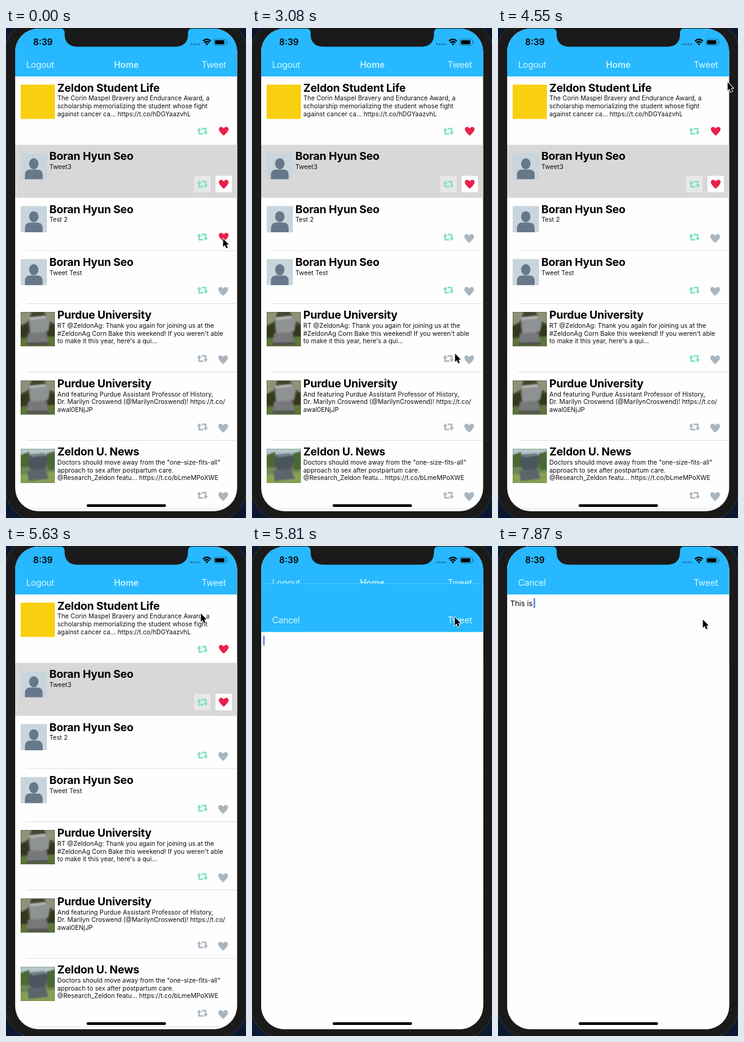
Animation, 393 px wide and 799 px high, one loop 8 s. Source, as an HTML page:

```html
<!DOCTYPE html>
<html lang="en">
<head>
<meta charset="utf-8">
<title>Timeline</title>
<style>
  html, body { margin: 0; width: 100%; height: 100%; overflow: hidden; background: #0a1830; }
  svg { display: block; width: 393px; height: 799px; font-family: Inter, "Liberation Sans", sans-serif; }
  text { white-space: pre; }
  .name { font-size: 18px; font-weight: 700; letter-spacing: -.22px; }
  .body { font-size: 10.35px; fill: #111; }
  .nav { font-size: 14.4px; letter-spacing: -.32px; fill: #d2f8ff; }
  .nav.bold { font-weight: 600; letter-spacing: -.1px; fill: #c6f5ff; }
  .clock { font-size: 14.2px; font-weight: 600; }
  .draft { font-size: 12px; }
</style>
</head>
<body>
<svg id="stage" viewBox="0 0 393 799">
  <defs>
    <clipPath id="screen"><rect x="15" y="1" width="363.5" height="787" rx="38"/></clipPath>
    <clipPath id="face"><rect width="43" height="43"/></clipPath>
    <clipPath id="square"><rect width="56" height="56"/></clipPath>
    <filter id="soft"><feGaussianBlur stdDeviation=".9"/></filter>
    <path id="heart" d="M0 7.2C-3 5.2-8-.2-8-3.2C-8-7.8-2.2-8.6 0-4.4C2.2-8.6 8-7.8 8-3.2C8-.2 3 5.2 0 7.2Z"/>
    <g id="share">
      <path d="M-5.3-1.4V4.2H1.4M-1.4-4.2H5.3V1.4" fill="none" stroke="currentColor" stroke-width="2.6"/>
      <path d="M-9-.9L-5.3-6L-1.6-.9ZM9 .9L5.3 6L1.6 .9Z" fill="currentColor"/>
    </g>
    <g id="person" clip-path="url(#face)">
      <rect width="43" height="43" fill="#c9d5dc"/>
      <path d="M7 43V36Q7 27 16 27H27Q36 27 36 36V43Z" fill="#66788a"/>
      <ellipse cx="21.5" cy="17.5" rx="7.7" ry="9" fill="#66788a"/>
    </g>
    <g id="badge"><rect width="56" height="56" fill="#f9d00f"/></g>
    <g id="stone" clip-path="url(#square)">
      <rect width="56" height="56" fill="#45452f"/>
      <g filter="url(#soft)">
        <path d="M0 0H18L12 16L0 22ZM38 0H56V20L46 14Z" fill="#8f9279"/>
        <path d="M0 24L12 20L14 40H0ZM46 22H56V42H44Z" fill="#34391f"/>
        <path d="M0 43L56 40V56H0Z" fill="#5d7637"/>
        <path d="M13 9L40 6L48 15L45 31L32 36H16Z" fill="#8e9293"/>
        <path d="M13 9L40 6L43 10L17 13Z" fill="#b2b5b3"/>
        <path d="M12 35L42 33L46 52H10Z" fill="#77787a"/>
        <path d="M10 50L46 49V54H9Z" fill="#515150"/>
      </g>
    </g>
    <g id="garden" clip-path="url(#square)">
      <rect width="56" height="56" fill="#6f8758"/>
      <g filter="url(#soft)">
        <path d="M0 0H56V12L40 17L0 11Z" fill="#b6c8cc"/>
        <path d="M0 10L14 5L18 30H0ZM42 8L56 4V34H44Z" fill="#4c6836"/>
        <path d="M0 42L56 38V56H0Z" fill="#87a052"/>
        <path d="M16 9L39 7L45 16L41 32L18 36L12 25Z" fill="#4b555d"/>
        <path d="M16 9L39 7L41 11L19 14Z" fill="#77838c"/>
        <path d="M11 36L40 32L46 49L13 53Z" fill="#5d656a"/>
      </g>
    </g>
  </defs>

  <rect x="-1.5" y="-15" width="396.5" height="819" rx="54" fill="#1a1a1a" stroke="#38393c"/>
  <g clip-path="url(#screen)">
    <rect width="393" height="799" fill="#fefefe"/>
    <g id="list"></g>
    <rect width="393" height="79" fill="#27b8ff"/>
    <text class="nav" x="33" y="64.7">Logout</text>
    <text class="nav bold" x="197" y="64.7" text-anchor="middle">Home</text>
    <text class="nav" x="320.3" y="64.7">Tweet</text>
    <g id="compose">
      <rect width="393" height="799" fill="#fefefe"/>
      <rect width="393" height="79" fill="#27b8ff"/>
      <text class="nav" x="33" y="64.7">Cancel</text>
      <text class="nav" x="320.3" y="64.7">Tweet</text>
      <text class="draft" id="draft" x="20" y="97.7"></text>
      <rect id="caret" y="85" width="2" height="16" fill="#4a67cf"/>
    </g>
    <text class="clock" x="44.6" y="28.2">8:39</text>
    <g fill="#1673a8" id="signal"></g>
    <g fill="none" stroke="#000" stroke-width="2.3">
      <path d="M322.6 21.3Q329 15.4 335.4 21.3M325 24.2Q329 20.4 333 24.2"/>
      <path d="M329 28.3L326.8 25.9Q329 24 331.2 25.9Z" fill="#000" stroke="none"/>
    </g>
    <rect x="340.7" y="18.3" width="20.4" height="9.8" rx="2.6" fill="none" stroke="#176f9f"/>
    <rect x="342.3" y="19.9" width="15.2" height="6.6" rx="1.3"/>
    <path d="M362.3 21.4Q364.6 23.2 362.3 25Z" fill="#176f9f"/>
    <rect x="132" y="776.6" width="130" height="4.4" rx="2.2"/>
  </g>
  <path d="M88 0Q96 1 96 8V10Q96 30.5 118 30.5H276Q298 30.5 298 10V8Q298 1 306 0Z" fill="#1a1a1a"/>
  <path id="cursor" d="M0 0V13.4L3 10.6L5.2 15.8L7.7 14.7L5.5 9.7H9.6Z"
        stroke="#fff" stroke-width="1.8" stroke-linejoin="round" paint-order="stroke"/>
</svg>
<script>
const LOOP = 8000;
const GREEN = '#80e3bf', GREY = '#a9b6c0', RED = '#e8214c';
const $ = id => document.getElementById(id);

const posts = [
  { name: 'Zeldon Student Life', art: 'badge', shared: true, liked: true, lines: [
    'The Corin Maspel Bravery and Endurance Award, a',
    'scholarship memorializing the student whose fight',
    'against cancer ca... https://t.co/hDGYaazvhL'] },
  { name: 'Boran Hyun Seo', art: 'person', shared: true, liked: true, selected: true, lines: ['Tweet3'] },
  { name: 'Boran Hyun Seo', art: 'person', shared: true, lines: ['Test 2'] },
  { name: 'Boran Hyun Seo', art: 'person', shared: true, lines: ['Tweet Test'] },
  { name: 'Purdue University', art: 'stone', lines: [
    'RT @ZeldonAg: Thank you again for joining us at the',
    "#ZeldonAg Corn Bake this weekend! If you weren't able",
    "to make it this year, here's a qui..."] },
  { name: 'Purdue University', art: 'stone', lines: [
    'And featuring Purdue Assistant Professor of History,',
    'Dr. Marilyn Croswend (@MarilynCroswend)! https://t.co/',
    'awal0ENjJP'] },
  { name: 'Zeldon U. News', art: 'garden', lines: [
    'Doctors should move away from the "one-size-fits-all"',
    'approach to sex after postpartum care.',
    '@Research_Zeldon featu... https://t.co/bLmeMPoXWE'] }
];

function rowMarkup(post, index, top) {
  const small = post.art === 'person';
  const x = small ? 71 : 84;
  const bottom = top + (small ? 86.4 : 111.5);
  const back = post.selected
    ? `<rect x="15" y="${top}" width="364" height="86.4" fill="#d8d8d8"/>
       <rect x="308" y="241" width="27" height="27" fill="#e7e7e7"/>
       <rect x="343" y="241" width="27" height="27" fill="#fefefe"/>`
    : index ? `<rect x="33" y="${bottom - .7}" width="346" height=".8" fill="#d6d6d8"/>` : '';
  const lines = post.lines.map((line, i) =>
    `<text class="body" x="${x}" y="${top + 39.3 + i * 12.6}">${line}</text>`).join('');
  return `${back}<use href="#${post.art}" x="24" y="${top + 13.3}"/>
    <text class="name" x="${x}" y="${top + 24.7}">${post.name}</text>${lines}
    <use href="#share" id="share${index}" x="321.7" y="${bottom - 22.2}"/>
    <use href="#heart" id="heart${index}"/>`;
}

const bottoms = [];
let top0 = 79;
$('list').innerHTML = posts.map((post, i) => {
  const markup = rowMarkup(post, i, top0);
  bottoms[i] = top0 += post.art === 'person' ? 86.4 : 111.5;
  return markup;
}).join('');
$('signal').innerHTML = [303, 307.4, 311.8, 316.2].map(x => `<circle cx="${x}" cy="26.6" r="1.5"/>`).join('');

function setLiked(i, liked) {
  const heart = $('heart' + i);
  heart.setAttribute('fill', liked ? RED : GREY);
  heart.setAttribute('x', liked ? 356.5 : 355.6);
  heart.setAttribute('y', bottoms[i] - (liked ? 22.2 : 20.2));
}
function setShared(i, shared) {
  $('share' + i).style.color = shared ? GREEN : GREY;
}
posts.forEach((post, i) => {
  setLiked(i, post.liked);
  setShared(i, post.shared);
});

// time, x, y
const pointer = [
  [0, 355.5, 343.5], [550, 355.5, 343.5], [850, 363, 385], [1180, 354.5, 429], [2800, 354.5, 429],
  [2850, 353, 436], [3080, 332.5, 531], [3250, 324, 550], [3490, 319, 541], [4100, 319, 541],
  [4150, 323, 520], [4380, 382, 113], [4500, 382, 113], [4550, 376, 88.5], [4650, 376, 88.5],
  [4700, 371, 83], [4870, 351, 71], [5060, 351, 71], [5110, 356, 64], [5300, 378, 25],
  [5450, 345, 60], [5630, 319, 110], [5690, 319, 110], [5810, 332, 116], [6100, 335.5, 120], [LOOP, 335.5, 120]
];
const phrase = 'This\u00a0is\u00a0';
const keyTimes = [7020, 7100, 7460, 7560, 7660, 7770, 7770, 7870];

const clamp = v => Math.max(0, Math.min(1, v));

function pointerAt(t) {
  const i = pointer.findIndex(key => key[0] > t);
  const [t0, x0, y0] = pointer[i - 1], [t1, x1, y1] = pointer[i];
  const p = (t - t0) / (t1 - t0);
  return [x0 + (x1 - x0) * p, y0 + (y1 - y0) * p];
}

// Critically damped slide of the compose sheet
function sheetOffset(t) {
  if (t < 5690) return 800;
  const k = (t - 5630) * .0225;
  return 709 * (1 + k) * Math.exp(-k);
}

function render(t) {
  setLiked(2, t < 210);
  setLiked(3, t >= 1860 && t < 2850);
  setShared(4, t >= 3910);
  $('compose').setAttribute('transform', `translate(0 ${sheetOffset(t).toFixed(2)})`);

  const count = keyTimes.filter(time => t >= time).length;
  const draft = $('draft');
  draft.textContent = phrase.slice(0, count);
  $('caret').setAttribute('x', 18.5 + (count ? draft.getComputedTextLength() : 0));
  $('caret').setAttribute('opacity', t < 6690 ? 1 - clamp((t - 6300) / 210) : clamp((t - 6830) / 180));

  $('cursor').setAttribute('transform', `translate(${pointerAt(t)})`);
}

const start = performance.now();
function tick() {
  render((performance.now() - start) % LOOP);
  requestAnimationFrame(tick);
}
tick();
</script>
</body>
</html>
```
